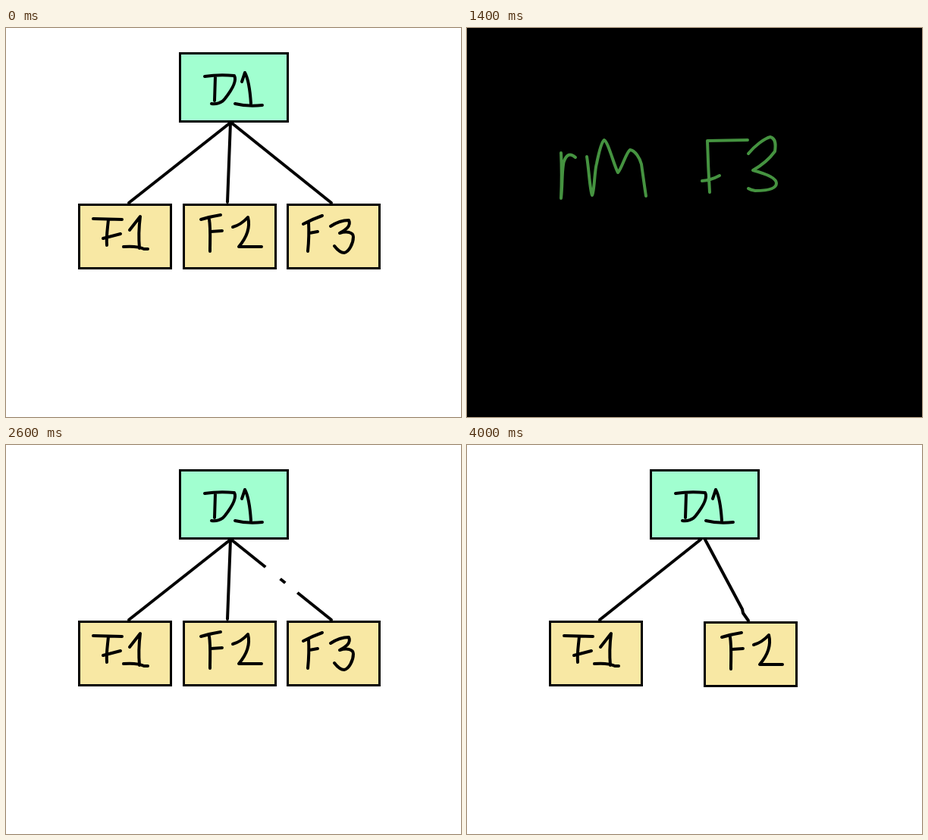
Animation of 600 by 514 pixels, one loop 5 s. Source, as an HTML page with a canvas:

```html
<!DOCTYPE html>
<html lang="en">
<meta charset="utf-8">
<title>Removing a file from a directory</title>
<style>
  html, body { margin: 0; height: 100%; overflow: hidden; background: #fff }
  canvas { display: block }
</style>
<canvas id="stage" width="600" height="514"></canvas>
<script>
const ctx = document.getElementById('stage').getContext('2d');
const LOOP = 5000;
const MINT = '#a1ffd0', SAND = '#f8e8a4', GREEN = '#459340';

// Handwritten labels, as pen strokes
const ink = {
  D1: 'M262,64C275,62 290,62 301,63C305,70 296,84 289,93C285,99 277,101 271,100M276,64L275,96' +
      'M311,71L315,59C320,68 322,85 323,100M302,100Q318,104 338,102',
  F1: 'M115,252L153,253M135,253C134,265 132,275 133,287M128,278L151,272' +
      'M163,267L177,249C175,265 175,280 176,291M155,289C168,288 178,290 182,292L187,292',
  F2: 'M257,253Q270,249 283,247M268,253C270,265 269,280 269,295M270,269L285,268' +
      'M299,263Q310,260 319,250C322,262 318,276 307,289L337,289',
  F3: 'M392,259Q403,253 417,248M399,257Q400,275 398,295M400,271L411,269' +
      'M428,262Q440,254 452,254C456,262 446,268 440,271C450,268 458,270 458,276' +
      'C458,285 452,296 446,297Q440,297 433,288'
};

const command =
  'M140,161C141,180 141,200 140,221C142,205 141,180 144,172Q149,158 159,167' +
  'M174,166C177,185 178,210 181,217C184,213 184,185 187,175C190,160 194,146 197,144' +
  'C202,146 210,178 215,187C220,182 226,160 231,157C238,158 244,168 246,176C248,190 250,205 252,218' +
  'M386,144L333,145Q334,180 336,213M326,198Q338,197 349,191' +
  'M387,162C395,152 408,142 416,140C424,142 423,152 422,159C414,170 402,179 393,184' +
  'C408,188 424,194 424,201C424,210 408,211 396,211Q390,210 387,208';

// Eraser marks: [start time, path, stroke width], filled when the width is 0
const erasures = [
  [2400, 'M342.5,161L361.5,177', 10],
  [2600, 'M368.5,182L384,195.5', 10],
  [2800, 'M383,222C402,248 424,268 442,277Q470,290 502,312', 20],
  [3000, 'M479,222C468,250 448,262 436,276Q420,296 406,328', 22],
  [3200, 'M366,219H498V323H451V241H366Z', 0],
  [3400, 'M355,172H400L451,219V323H403V219H355Z', 0],
  [3600, 'M366,235H405V323H366Z', 0],
  [3800, 'M300,125H350V168H340L298,131Z', 0]
];

function stroke(path, color, width, cap = 'round') {
  ctx.strokeStyle = color;
  ctx.lineWidth = width;
  ctx.lineCap = cap;
  ctx.lineJoin = 'round';
  ctx.stroke(new Path2D(path));
}

function background(color) {
  ctx.fillStyle = color;
  ctx.fillRect(0, 0, 600, 514);
}

function box(label, x, y, w, h, fill, dx = 0, dy = 0) {
  ctx.save();
  ctx.translate(dx, dy);
  ctx.fillStyle = '#000';
  ctx.fillRect(x, y, w, h);
  ctx.fillStyle = fill;
  ctx.fillRect(x + 3, y + 3, w - 6, h - 6);
  stroke(ink[label], '#000', 4);
  ctx.restore();
}

const folder = dx => box('D1', 228, 32, 145, 93, MINT, dx);
const file = (label, x, dx, dy) => box(label, x, 232, 124, 87, SAND, dx, dy);

function drawCommand(t) {
  const bold = Math.floor((t - 400) / 200) % 2;
  background('#000');
  ctx.save();
  if (bold) ctx.translate(-16, 4);
  stroke(command, GREEN, bold ? 4 : 2.2);
  ctx.restore();
}

function drawTree(t) {
  background('#fff');
  stroke('M162,231L296,125L292,230M297,125L429,231', '#000', 4);
  folder(0);
  file('F1', 95);
  file('F2', 233);
  file('F3', 370);
  for (const [start, path, width] of erasures) {
    if (t < start) break;
    ctx.fillStyle = '#fff';
    if (width) stroke(path, '#fff', width, 'butt');
    else ctx.fill(new Path2D(path));
  }
}

function drawResult() {
  background('#fff');
  stroke('M175,231L308,125M314,125L363,217L364,222L371,232', '#000', 4);
  folder(13);
  file('F1', 95, 13);
  file('F2', 233, 79, 1);
}

function frame(now) {
  const t = now % LOOP;
  if (t >= 400 && t < 2200) drawCommand(t);
  else if (t < 4000) drawTree(t);
  else drawResult();
  requestAnimationFrame(frame);
}
requestAnimationFrame(frame);
</script>
</html>
```
